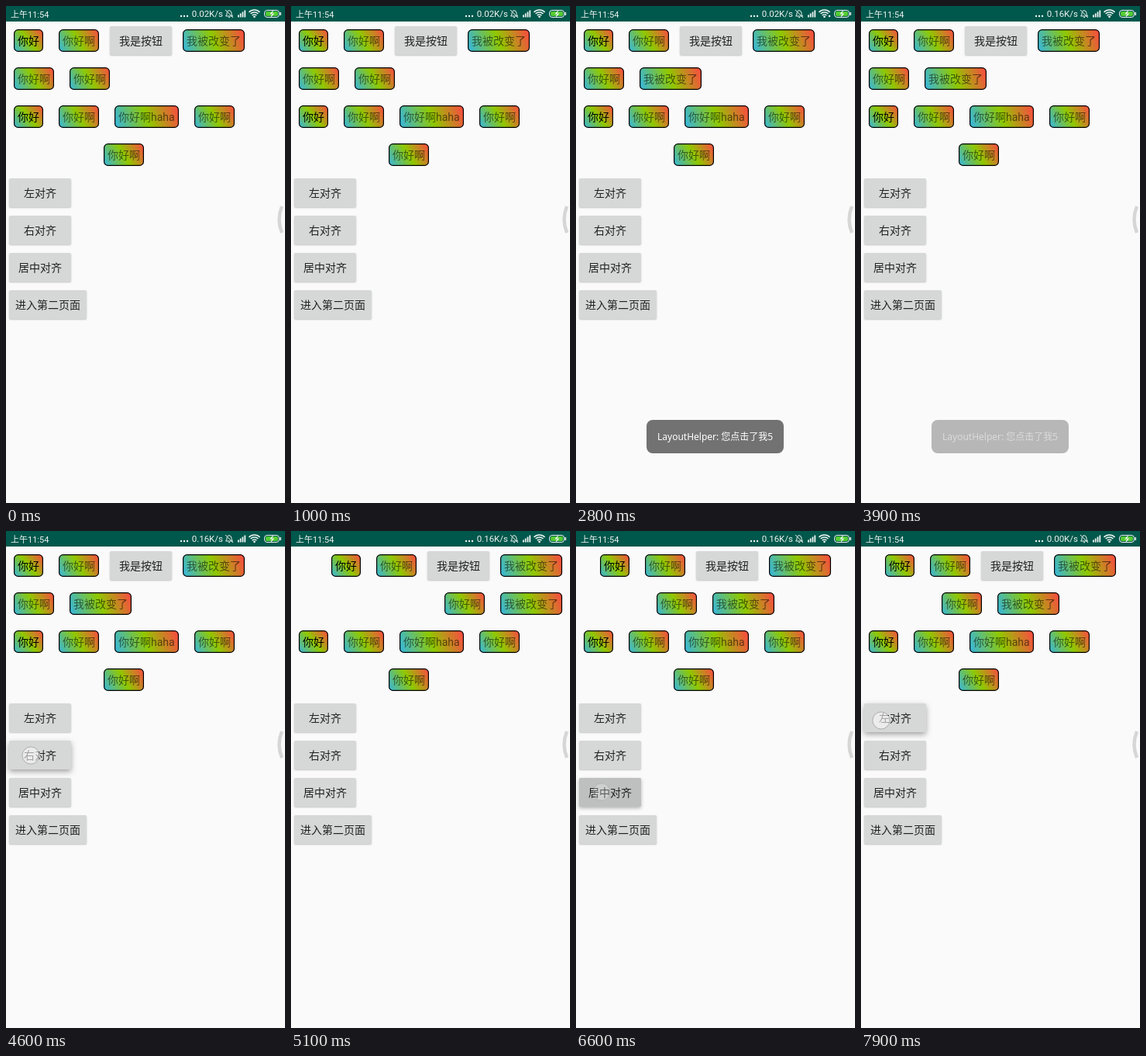
Write an HTML page with a canvas that moves like this. It is 360 px wide and 640 px high and loops after 8000 ms.

```html
<!DOCTYPE html>
<html lang="zh-CN">
<head>
<meta charset="utf-8">
<style>
html, body { margin: 0; height: 100%; overflow: hidden; background: #fafafa; }
canvas { display: block; width: 100vw; height: 100vh; }
</style>
</head>
<body>
<canvas id="stage" width="360" height="640"></canvas>
<script>
const ctx = document.getElementById('stage').getContext('2d');
const LOOP = 8000;
const FONT = 'Roboto, "Noto Sans CJK SC", "Noto Sans CJK", sans-serif';
const CHANGED = '我被改变了';
const TEXT_CHANGE = 1700, ALIGN_RIGHT = 4660, ALIGN_CENTER = 6500;

// Finger taps; button is the index in the left column
const TAPS = [
  { down: 1540, up: 1690, x: 108, y: 95 },
  { down: 4490, up: 4650, x: 32, y: 289, button: 1 },
  { down: 6330, up: 6490, x: 33, y: 336, button: 2 },
  { down: 7770, up: 8200, x: 26, y: 244, button: 0 }
];

const clamp = v => Math.max(0, Math.min(1, v));
const ramp = (t, start, duration) => clamp((t - start) / duration);

function roundRect(x, y, w, h, r) {
  ctx.beginPath();
  ctx.roundRect(x, y, w, h, r);
}

function text(str, x, y, font, color, align = 'left') {
  ctx.font = font;
  ctx.fillStyle = color;
  ctx.textAlign = align;
  ctx.fillText(str, x, y);
}

function line(points, color, width) {
  ctx.beginPath();
  points.forEach(([x, y]) => ctx.lineTo(x, y));
  ctx.strokeStyle = color;
  ctx.lineWidth = width;
  ctx.stroke();
}

function disc(x, y, r, color) {
  ctx.beginPath();
  ctx.arc(x, y, r, 0, 7);
  ctx.fillStyle = color;
  ctx.fill();
}

function chip(label, x, y, w) {
  const h = 29;
  const fill = ctx.createLinearGradient(x, y + h, x + w, y);
  fill.addColorStop(0, '#33b5e5');
  fill.addColorStop(0.5, '#90c800');
  fill.addColorStop(1, '#ff4444');
  roundRect(x + 0.6, y + 0.6, w - 1.2, h - 1.2, 5);
  ctx.fillStyle = fill;
  ctx.fill();
  ctx.strokeStyle = '#000';
  ctx.lineWidth = 1.2;
  ctx.stroke();
  const strong = label === '你好';
  text(label, x + 5, y + 20, `${strong ? 500 : 400} 14px ${FONT}`,
    strong ? '#000' : 'rgba(0,0,0,.54)');
}

function button(label, x, y, w, t, tap) {
  const h = 37;
  let lift = 0;
  if (tap) lift = ramp(t, tap.down, 100) * (1 - ramp(t, tap.up, 220));
  ctx.save();
  ctx.shadowColor = `rgba(0,0,0,${0.22 + lift * 0.13})`;
  ctx.shadowBlur = 2 + lift * 5;
  ctx.shadowOffsetY = 1 + lift * 2;
  roundRect(x, y, w, h, 2);
  ctx.fillStyle = '#d6d7d7';
  ctx.fill();
  ctx.restore();
  if (tap && t > tap.up) {
    ctx.save();
    roundRect(x, y, w, h, 2);
    ctx.clip();
    ctx.globalAlpha = 1 - ramp(t, tap.up + 120, 300);
    disc(tap.x, tap.y, 70 * ramp(t, tap.up - 20, 110), '#bebfbf');
    ctx.restore();
  }
  text(label, x + w / 2, y + 23.5, `500 14px ${FONT}`, '#212121', 'center');
}

function statusBar(t) {
  const white = '#eef4f2';
  ctx.fillStyle = '#00574b';
  ctx.fillRect(0, 0, 360, 20);
  text('上午11:54', 6, 14.5, `11px ${FONT}`, white);
  [226, 230, 234].forEach(x => disc(x, 13, 1.2, white));
  const speed = t < 2850 ? '0.02' : t < 6850 ? '0.16' : '0.00';
  text(speed + 'K/s', 280, 14, `11.5px ${FONT}`, white, 'right');

  // Muted bell
  line([[283.5, 13], [285, 11], [285, 8.5], [286, 6.5], [288, 5.7],
    [290, 6.7], [291, 9], [291, 11], [292.5, 13], [283.5, 13]], white, 1);
  line([[283, 5], [293, 15]], white, 1);
  line([[287, 14.7], [289, 14.7]], white, 1);

  ctx.fillStyle = white;
  for (let i = 0; i < 4; i++) {
    const h = 3 + i * 2;
    ctx.fillRect(299 + i * 2.8, 14.5 - h, 1.8, h);
  }

  // Wi-Fi, with a mark while data is moving
  [4, 7, 10].forEach(r => {
    ctx.beginPath();
    ctx.arc(320.5, 15, r, -Math.PI * 0.75, -Math.PI * 0.25);
    ctx.lineWidth = 1.5;
    ctx.strokeStyle = white;
    ctx.stroke();
  });
  disc(320.5, 13.8, 1.4, white);
  if (t > 1850 && t < 2850) disc(327, 13, 1.3, white);

  // Charging battery
  roundRect(333.5, 5.5, 19, 9, 3.5);
  ctx.lineWidth = 1;
  ctx.stroke();
  roundRect(335, 7, 16, 6, 2);
  ctx.fillStyle = '#55cc33';
  ctx.fill();
  ctx.fillStyle = white;
  ctx.fillRect(353.5, 8, 1.5, 4);
  line([[344.5, 6.5], [341.5, 10], [345, 10], [342, 13.5]], white, 1.2);
}

function toast(t) {
  if (t < 1770 || t > 4050) return;
  const remaining = (1 - ramp(t, 1770, 260)) ** 2;
  const y = 533 + 36 * remaining;
  ctx.save();
  ctx.globalAlpha = (1 - remaining) * (1 - ramp(t, 3750, 300));
  roundRect(91, y, 177, 43, 8);
  ctx.fillStyle = '#727272';
  ctx.fill();
  text('LayoutHelper: 您点击了我5', 105, y + 26,
    '300 12px "Noto Sans", "Noto Sans CJK SC", sans-serif', '#fff');
  ctx.restore();
}

function touches(t) {
  for (const { down, up, x, y } of TAPS) {
    if (t < down || t > up + 200) continue;
    ctx.save();
    ctx.globalAlpha = ramp(t, down - 60, 100) * (1 - ramp(t, up, 200));
    disc(x, y, 11, 'rgba(250,250,250,.6)');
    ctx.strokeStyle = 'rgba(120,120,120,.5)';
    ctx.lineWidth = 1;
    ctx.stroke();
    ctx.restore();
  }
}

function draw(t) {
  ctx.fillStyle = '#fafafa';
  ctx.fillRect(0, 0, 360, 640);
  statusBar(t);

  const align = t < ALIGN_RIGHT ? 0 : t < ALIGN_CENTER ? 1 : 0.5;
  const row1 = 42 * align;
  chip('你好', 10 + row1, 30, 38);
  chip('你好啊', 68 + row1, 30, 52);
  button('我是按钮', 134 + row1, 26, 80, t);
  chip(CHANGED, 228 + row1, 30, 80);

  const changed = t >= TEXT_CHANGE;
  const row2 = 188 * align;
  chip('你好啊', 10 + row2, 79, 52);
  chip(changed ? CHANGED : '你好啊', 82 + row2, 79, changed ? 80 : 52);

  chip('你好', 10, 128, 38);
  chip('你好啊', 68, 128, 52);
  chip('你好啊haha', 140, 128, 83);
  chip('你好啊', 243, 128, 52);
  chip('你好啊', 126, 177, 52);

  ['左对齐', '右对齐', '居中对齐', '进入第二页面'].forEach((label, i) =>
    button(label, 4, 222 + 48 * i, i === 3 ? 100 : 80, t,
      TAPS.find(tap => tap.button === i)));

  // Edge handle
  ctx.beginPath();
  ctx.moveTo(356, 258);
  ctx.quadraticCurveTo(349, 275, 356, 292);
  ctx.strokeStyle = '#d6d6d6';
  ctx.lineWidth = 4.5;
  ctx.stroke();

  toast(t);
  touches(t);
}

const start = performance.now();
function frame() {
  draw((performance.now() - start) % LOOP);
  requestAnimationFrame(frame);
}
frame();
</script>
</body>
</html>
```
